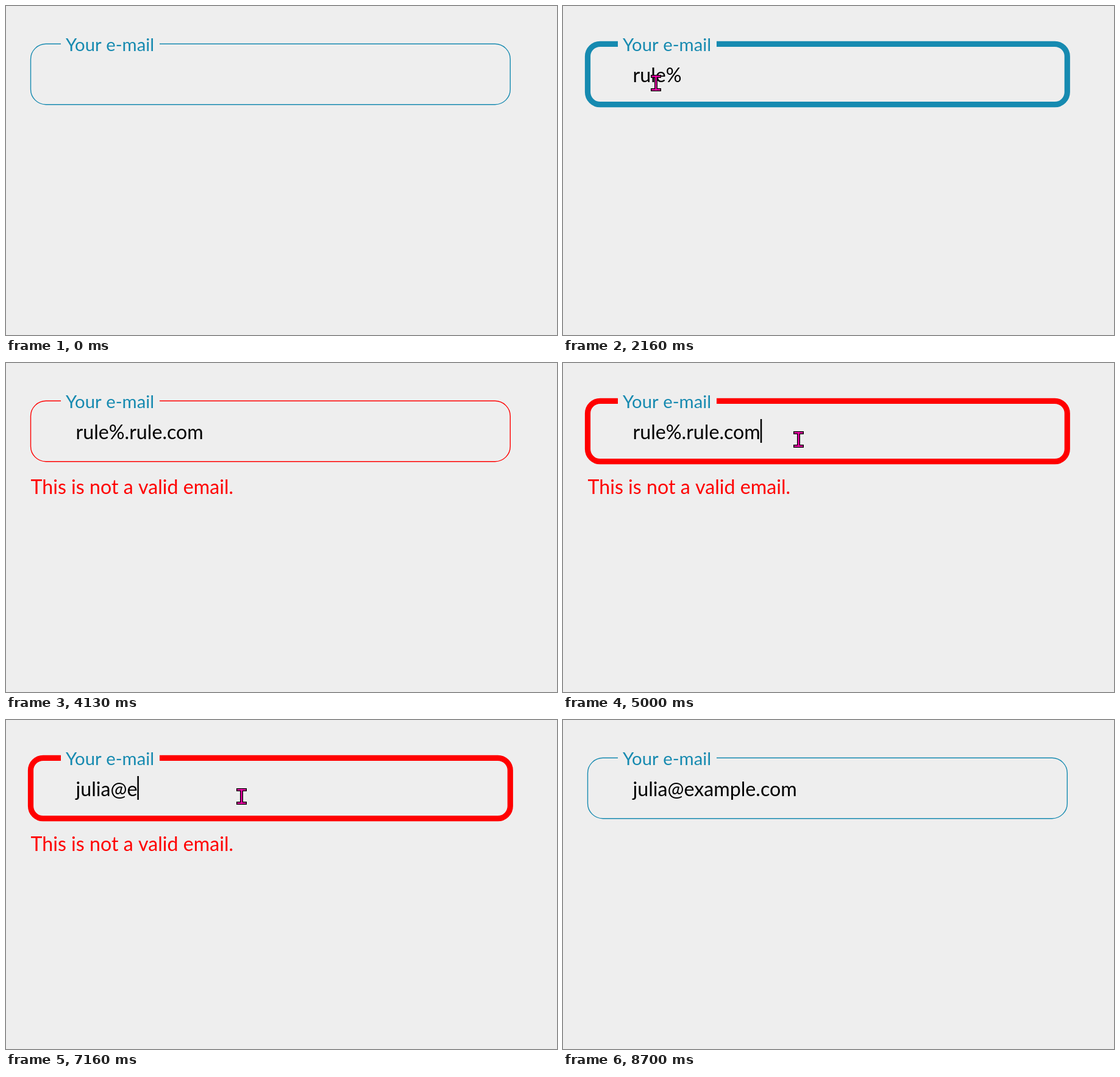
Write an HTML page with a canvas that moves like this. It is 904x540 px and loops after 9530 ms.

```html
<!DOCTYPE html>
<html lang="en">
<head>
<meta charset="utf-8">
<title>E-mail field validation</title>
<style>
  html, body { margin: 0; width: 100%; height: 100%; overflow: hidden; background: #eeeeee; }
  canvas { display: block; }
</style>
</head>
<body>
<canvas id="stage" width="904" height="540"></canvas>
<script>
const ctx = document.getElementById('stage').getContext('2d');
const W = 904, H = 540, LOOP = 9530, BLINK = 260;
const TEAL = '#168ab0', RED = '#ff0000', PAPER = '#eeeeee';
const BAD = 'rule%.rule.com', GOOD = 'julia@example.com';
const TEXT_X = 114.5, TEXT_SIZE = 32.2;

// one run of evenly spaced keystrokes, changing the letter count step by step
const burst = (text, from, to, start, end = start) => ({ text, from, to, start, end });
const BURSTS = [
  burst(BAD, 0, 4, 1400, 1730),
  burst(BAD, 4, 5, 1900),
  burst(BAD, 5, 6, 2430),
  burst(BAD, 6, 10, 2700, 2930),
  burst(BAD, 10, 14, 3100, 3330),
  burst(BAD, 14, 13, 5600),
  burst(BAD, 13, 0, 5800, 6060),
  burst(GOOD, 0, 5, 6430, 6700),
  burst(GOOD, 5, 6, 6960),
  burst(GOOD, 6, 13, 7160, 7730),
  burst(GOOD, 13, 17, 7900, 8130)
];

// pointer: moves between two points, then rests until it is gone
const OVER_TEXT = [152.5, 126.5], OVER_FIELD = [386.5, 125.5];
const MOVES = [
  { start: 300, end: 600, gone: 4030, from: [592.5, 461.5], to: OVER_TEXT },
  { start: 4030, end: 4130, gone: 4130, from: [390, 170], to: [904, 270] },
  { start: 4600, end: 4830, gone: 8660, from: [885.5, 286.5], to: OVER_FIELD },
  { start: 8660, end: 8700, gone: 8700, from: [737.5, 180.5], to: [904, 235] }
];

const FOCUS = [[900, 3630], [5000, 8400]];
const ERROR = [[3660, 8500]];

const spanAt = (spans, t) => spans.find(([a, b]) => t >= a && t < b);
const mix = (a, b, p) => a + (b - a) * p;

// text in the field and the time of the latest keystroke
function typedAt(t) {
  const b = BURSTS.filter(k => k.start <= t).pop();
  if (!b) return { str: '', time: 0 };
  const keys = Math.abs(b.to - b.from);
  const gap = keys > 1 ? (b.end - b.start) / (keys - 1) : 0;
  const done = gap ? Math.min(keys, 1 + Math.floor((t - b.start) / gap)) : keys;
  const count = b.from + done * Math.sign(b.to - b.from);
  return { str: b.text.slice(0, count), time: b.start + (done - 1) * gap };
}

function write(str, x, y, size, color) {
  ctx.font = `${size}px Lato, sans-serif`;
  ctx.fillStyle = color;
  ctx.fillText(str, x, y);
  return ctx.measureText(str).width;
}

// rounded frame, open at the top for the label
function frame(color, thick) {
  const l = 40.5, r = 827.3, t = 62.3, b = 161.7, rad = thick ? 20.5 : 25;
  ctx.beginPath();
  ctx.moveTo(252, t);
  ctx.arcTo(r, t, r, b, rad);
  ctx.arcTo(r, b, l, b, rad);
  ctx.arcTo(l, b, l, t, rad);
  ctx.arcTo(l, t, r, t, rad);
  ctx.lineTo(90, t);
  ctx.strokeStyle = color;
  ctx.lineWidth = thick ? 9.2 : 1.4;
  ctx.stroke();
}

// text-select pointer: two serifs and a stem, drawn smaller for the inner colour
function beam(x, y, color, inset) {
  const bar = (cx, cy, w, h) =>
    ctx.fillRect(cx - w / 2 + inset, cy - h / 2 + inset, w - 2 * inset, h - 2 * inset);
  ctx.fillStyle = color;
  bar(x, y - 11, 17, 5);
  bar(x, y + 11, 17, 5);
  bar(x, y, 5, 27);
}

function drawPointer(t) {
  const m = MOVES.find(k => t >= k.start && t < k.gone);
  if (!m) return;
  const p = Math.min(1, (t - m.start) / (m.end - m.start));
  const [x, y] = m.from.map((v, i) => mix(v, m.to[i], p));
  beam(x, y, '#000', 0);
  beam(x, y, '#ff00b4', 1.4);
}

function draw(t) {
  const focus = spanAt(FOCUS, t), error = spanAt(ERROR, t);
  ctx.fillStyle = PAPER;
  ctx.fillRect(0, 0, W, H);
  frame(error ? RED : TEAL, focus);
  write('Your e-mail', 98, 74, 29.3, TEAL);
  if (error) write('This is not a valid email.', 40.5, 215, TEXT_SIZE, RED);

  const { str, time } = typedAt(t);
  const width = write(str, TEXT_X, 125, TEXT_SIZE, '#000');
  if (focus) {
    const idle = t - Math.max(time, focus[0]);
    if (Math.floor(idle / BLINK) % 2 === 0) ctx.fillRect(TEXT_X + width, 92, 2.5, 39);
  }
  drawPointer(t);
}

const begin = performance.now();
function tick() {
  draw((performance.now() - begin) % LOOP);
  requestAnimationFrame(tick);
}
tick();
</script>
</body>
</html>
```
